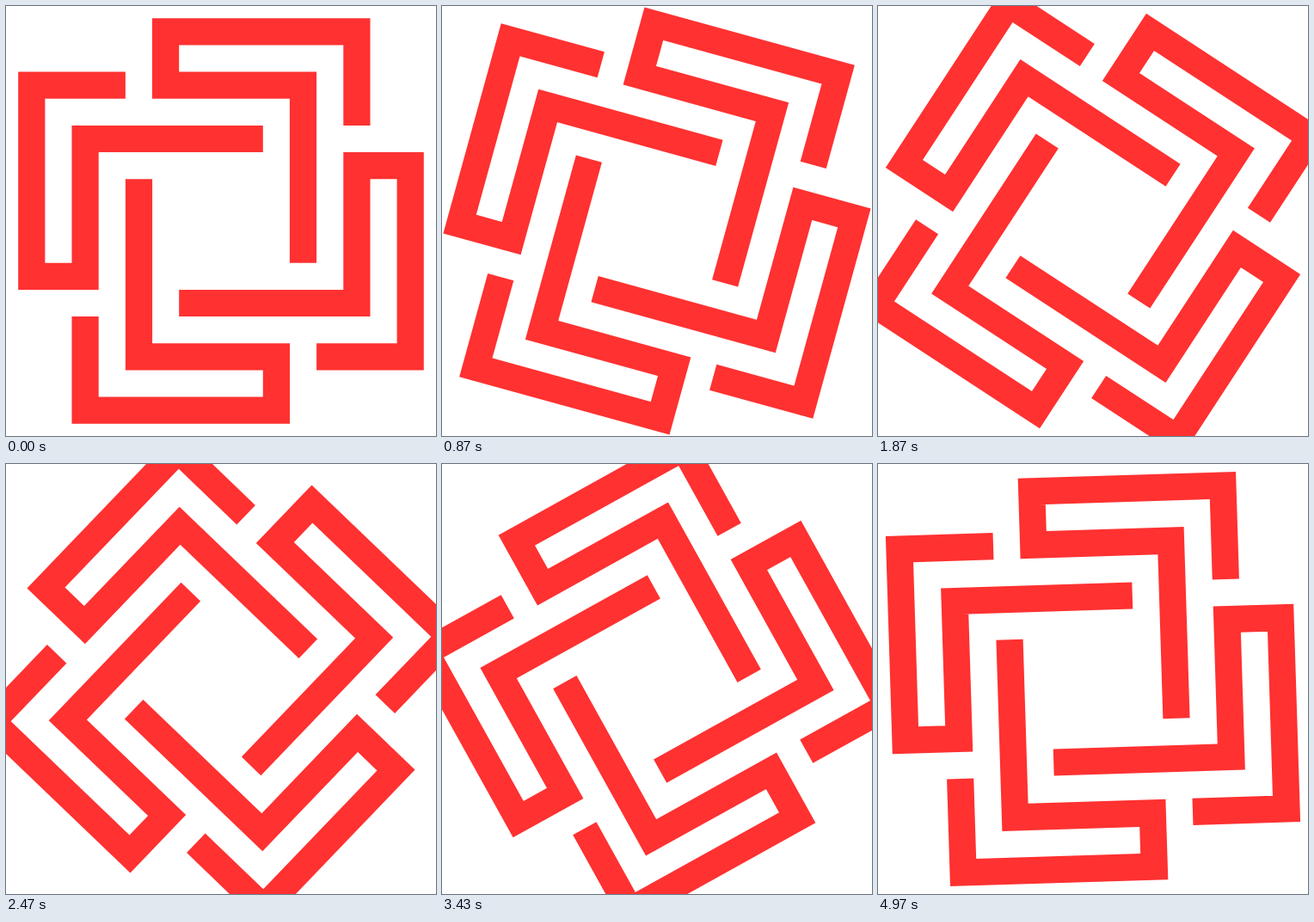
Write an HTML page that moves like this. It is 500 px wide and 500 px high and loops after 5010 ms.

```html
<!DOCTYPE html>
<html lang="en">
<head>
<meta charset="utf-8">
<title>Rotating knot</title>
<style>
  html, body { margin: 0; width: 100%; height: 100%; overflow: hidden; background: #fff; }
  svg { display: block; width: 100%; height: 100%; }
</style>
</head>
<body>
<svg viewBox="-250 -250 500 500">
  <defs>
    <path id="arm" d="M157.9-111.1V-220.2H-64.4V-157.9H95.5V48.8"/>
  </defs>
  <g id="knot" fill="none" stroke="#ff3131" stroke-width="31.2">
    <use href="#arm"/>
    <use href="#arm" transform="rotate(90)"/>
    <use href="#arm" transform="rotate(180)"/>
    <use href="#arm" transform="rotate(270)"/>
  </g>
</svg>
<script>
  const LOOP = 5010;
  const STEPS = 150;
  const STEP_ANGLE = 0.592;
  const knot = document.getElementById('knot');
  const start = performance.now();

  // Thirty steps a second, with step times rounded to 10 ms.
  function draw(time) {
    const step = Math.min(STEPS - 1, Math.floor((time + 3.4) * 0.03));
    knot.setAttribute('transform', `rotate(${step * STEP_ANGLE})`);
  }

  function tick() {
    draw((performance.now() - start) % LOOP);
    requestAnimationFrame(tick);
  }
  tick();
</script>
</body>
</html>
```
